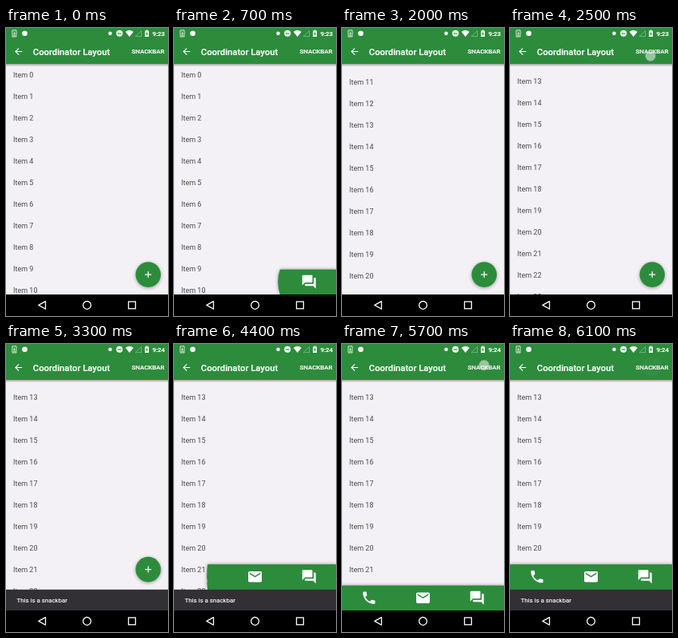
Recreate the animation shown at these times as an HTML page. Size 203 by 361 pixels, loop 6.6 s.

```html
<!DOCTYPE html>
<html lang="en">
<head>
<meta charset="utf-8">
<title>Coordinator Layout</title>
<style>
  html, body { margin: 0; width: 100%; height: 100%; overflow: hidden; background: #f3f1f5; }
  svg { display: block; width: 203px; height: 361px; font-family: Roboto, sans-serif; }
  .green { fill: #2c8c3b; }
  .white { fill: #fff; }
  .line { fill: none; stroke: #fff; }
  .bold { font-weight: 500; stroke: #fff; stroke-width: .2px; }
  #list { font-size: 9.02px; fill: #4b4a4c; }
  #bar { filter: drop-shadow(0 .5px 2px rgba(0, 0, 0, .4)); }
  #fab { filter: drop-shadow(0 1.6px 2px rgba(0, 0, 0, .36)); }
</style>
</head>
<body>
<svg viewBox="0 0 203 361">
  <defs>
    <linearGradient id="shade" x2="0" y2="1">
      <stop stop-opacity=".32"/>
      <stop offset="1" stop-opacity="0"/>
    </linearGradient>
    <clipPath id="reveal"><circle id="hole" cx="178.2" cy="318.2" r="0"/></clipPath>
    <clipPath id="top"><rect width="203" height="45"/></clipPath>
  </defs>

  <rect width="203" height="361" fill="#f3f1f5"/>
  <g id="list"></g>

  <g id="bar">
    <g clip-path="url(#reveal)">
      <rect class="green" y="302.7" width="203" height="32"/>
      <g class="white">
        <path transform="translate(23.6 308) scale(.85)" d="M6.62 10.79c1.44 2.83 3.76 5.14 6.59 6.59l2.2-2.2c.27-.27.67-.36 1.02-.24 1.12.37 2.33.57 3.57.57.55 0 1 .45 1 1V20c0 .55-.45 1-1 1-9.39 0-17-7.61-17-17 0-.55.45-1 1-1h3.5c.55 0 1 .45 1 1 0 1.25.2 2.45.57 3.57.11.35.03.74-.25 1.02z"/>
        <path transform="translate(91.3 308) scale(.85)" d="M20 4H4c-1.1 0-2 .9-2 2v12c0 1.1.9 2 2 2h16c1.1 0 2-.9 2-2V6c0-1.1-.9-2-2-2zm0 4l-8 5-8-5V6l8 5 8-5z"/>
        <path transform="translate(159 308) scale(.85)" d="M21 6h-2v9H6v2c0 .55.45 1 1 1h11l4 4V7c0-.55-.45-1-1-1zm-4 6V3c0-.55-.45-1-1-1H3c-.55 0-1 .45-1 1v14l4-4h10c.55 0 1-.45 1-1z"/>
      </g>
    </g>
  </g>

  <g id="fab">
    <circle class="green" cx="178.2" cy="309.1" r="15.8"/>
    <path class="line" stroke-width="1.2" d="M174.2 309.1h8M178.2 305.1v8"/>
  </g>

  <g id="snack">
    <rect y="334.3" width="203" height="27" fill="#323034"/>
    <text class="white" x="13.5" y="350.1" font-size="7.9" stroke="#fff" stroke-width=".15">This is a snackbar</text>
  </g>

  <rect y="45" width="203" height="3.5" fill="url(#shade)"/>
  <rect class="green" width="203" height="45"/>
  <g class="white">
    <path transform="translate(8.9 22.7) scale(.565)" d="M20 11H7.83l5.59-5.59L12 4l-8 8 8 8 1.41-1.41L7.83 13H20z"/>
    <text class="bold" x="33.8" y="33.6" font-size="11.28">Coordinator Layout</text>
    <text class="bold" x="157.6" y="32.4" font-size="7.9">SNACKBAR</text>
    <text id="clock" class="bold" x="199" y="9.9" font-size="7.9" text-anchor="end"></text>
    <circle cx="23.5" cy="6.8" r="3.3"/>
    <circle cx="130.5" cy="6.8" r="2.3"/>
    <circle cx="142.2" cy="6.8" r="4"/>
    <path d="M149.7 4.7Q154.7 1 159.7 4.7L154.7 11z"/>
    <path d="M174 3.6h1.5v-1h2v1h1.5V11H174z"/>
  </g>
  <path class="green" d="M140 6.2h4.4v1.2H140zM177 4.6l-1.9 3.2h1.2V10l1.8-3.2h-1.1z"/>
  <path class="line" stroke-width=".8" d="M7.9 2.8h5v8.2h-5zM10.4 4.5v3.5M9 6.8l1.4 1.5 1.4-1.5M9 9.6h2.8"/>
  <path class="line" stroke-width=".7" opacity=".45" d="M169.6 3.4v7.2h-7.2z"/>
  <circle id="ripple" class="white" cx="178" cy="28.5" r="12.5" clip-path="url(#top)"/>

  <rect y="334" width="203" height="27"/>
  <g class="line" stroke-width="1.3">
    <path stroke-linejoin="round" d="M49.5 342.6v9.6l-8.7-4.8z"/>
    <circle cx="101.5" cy="347.4" r="4.9"/>
    <rect x="153.5" y="343" width="8.8" height="8.8"/>
  </g>

  <circle id="dot" r="6.3" fill="#fff" fill-opacity=".5" stroke="#aaa" stroke-opacity=".55" stroke-width=".8"/>
</svg>

<script>
  const LOOP = 6600, STEP = 100;
  const PITCH = 27, SCROLL = 343.2, RISE = 26.5, DROP = 9, REACH = 185;

  // Touches: start, end, x, y. A touch travels with the list.
  const touches = [
    [400, 600, 178, 309],
    [1500, 1900, 110.5, 213],
    [2500, 2800, 176, 35],
    [4000, 4200, 178, 283],
    [5700, 5800, 178, 26.5]
  ];

  const $ = id => document.getElementById(id);
  const set = (id, name, v) => $(id).setAttribute(name, v);
  const show = (id, on) => set(id, 'visibility', on ? 'visible' : 'hidden');
  const shift = (id, y) => set(id, 'transform', `translate(0 ${y})`);

  const ramp = (t, from, span) => Math.min(1, Math.max(0, (t - from) / span));
  const smooth = p => p * p * (3 - 2 * p);
  const ease = (t, from, span) => smooth(ramp(t, from, span));

  // A swipe that starts gently and ends as a long fling.
  const scroll = t => SCROLL * smooth(1 - (1 - ramp(t, 1500, 1006)) ** 2);
  const snack = t => ease(t, 2730, 360) - ease(t, 4500, 340) + ease(t, 5730, 360);
  const drop = t => ease(t, 500, 200) - ease(t, 1800, 200) + ease(t, 4100, 200);
  const reveal = t => ease(t, 600, 300) - ease(t, 1500, 300) + ease(t, 4200, 300);
  const glow = (t, from, rest) => t < from ? 0 : .2 + (rest - .2) * ramp(t, from, 300);

  for (let i = 0; i < 26; i++) {
    const row = document.createElementNS('http://www.w3.org/2000/svg', 'text');
    row.textContent = 'Item ' + i;
    row.setAttribute('x', 9);
    row.setAttribute('y', 62.1 + i * PITCH);
    $('list').append(row);
  }

  function draw(t) {
    const lift = -RISE * snack(t), radius = REACH * reveal(t), open = radius > .01;

    shift('list', -scroll(t));
    shift('snack', lift);
    shift('bar', lift);
    shift('fab', lift + DROP * drop(t));
    set('hole', 'r', radius);
    show('bar', open);
    show('fab', !open);
    set('ripple', 'opacity', glow(t, 2800, 0) + glow(t, 5800, .03));
    $('clock').textContent = t < 3300 ? '9:23' : '9:24';

    const touch = touches.find(([from, to]) => t >= from && t < to);
    show('dot', touch);
    if (touch) {
      const [from, , x, y] = touch;
      set('dot', 'cx', x);
      set('dot', 'cy', y + scroll(from) - scroll(t));
    }
  }

  const start = performance.now();
  function tick() {
    const t = (performance.now() - start) % LOOP;
    draw(Math.floor(t / STEP) * STEP);
    requestAnimationFrame(tick);
  }
  tick();
</script>
</body>
</html>
```
